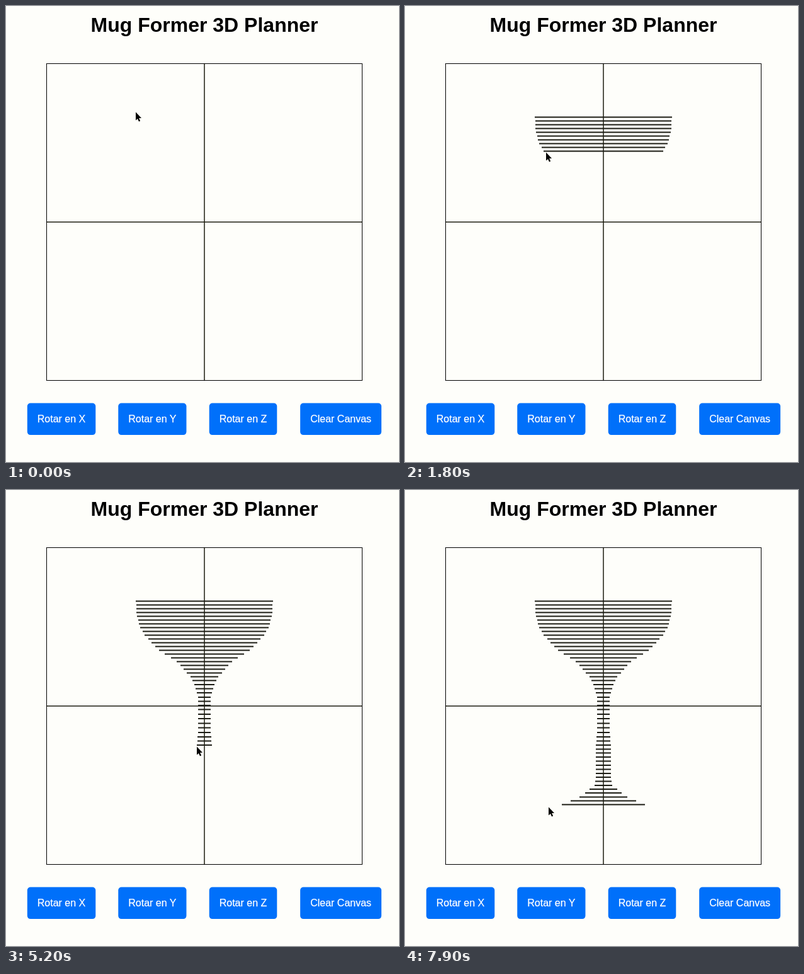
An HTML page for the animation above (8000 ms loop, 624 px wide and 724 px high).

```html
<!DOCTYPE html>
<html lang="en">
<head>
<meta charset="utf-8">
<title>Mug Former 3D Planner</title>
<style>
  html, body { margin: 0; width: 100%; height: 100%; overflow: hidden; background: #fefefa; }
  svg { display: block; width: 624px; height: 724px; }
  text { font-family: "Liberation Sans", Arial, sans-serif; text-anchor: middle; }
  .title { font-size: 32px; font-weight: bold; }
  .button rect { fill: #0070fa; }
  .button text { font-size: 16px; fill: #fff; stroke: #fff; stroke-width: .25; }
  .frame { fill: none; stroke: #000; }
  .axis { stroke: #1c1c10; stroke-width: 1.5; }
  .rings line { stroke: #1c1c14; stroke-width: 2; }
</style>
</head>
<body>
<svg viewBox="0 0 624 724">
  <text class="title" x="315" y="41">Mug Former 3D Planner</text>
  <rect class="frame" x="64.5" y="91.5" width="501" height="503"/>
  <path class="axis" d="M315 92V594M65 343H565"/>
  <g class="rings" id="rings"></g>
  <g id="buttons"></g>
  <g id="cursor">
    <path d="M0 0V13L3 10.4L5 15L7.1 14.1L5.1 9.5H9Z" fill="#000" stroke="#fffff0" paint-order="stroke"/>
  </g>
</svg>
<script>
const LOOP = 8000, STEP = 100, CENTER = 315, RINGS = 52;
const $ = id => document.getElementById(id);

// Key points: ring number to height, height to radius, time to pointer height
const rows = [[0, 176.5], [21, 302.5], [28, 348.5], [34, 392], [46, 469], [51, 499.5]];
const profile = [[176, 109], [201, 107], [218, 102], [230, 95], [254, 73], [273, 43], [297, 22],
  [310, 15], [329, 10], [384, 10], [411, 12], [457, 12], [469, 14], [487, 37], [499.5, 66], [505, 87]];
const travel = [[0, 170], [2700, 266], [3900, 323], [5200, 409], [6100, 471], [7900, 505]];

function lerp(points, x) {
  const next = points.findIndex(p => p[0] >= x);
  if (next < 0) return points[points.length - 1][1];
  if (next === 0) return points[0][1];
  const [x0, y0] = points[next - 1], [x1, y1] = points[next];
  return y0 + (y1 - y0) * (x - x0) / (x1 - x0);
}

function add(parent, tag, attrs, text = "") {
  const el = document.createElementNS("http://www.w3.org/2000/svg", tag);
  for (const key in attrs) el.setAttribute(key, attrs[key]);
  el.textContent = text;
  return parent.appendChild(el);
}

const rings = Array.from({ length: RINGS }, (_, i) => {
  const y = Math.round(lerp(rows, i) * 2) / 2;
  const r = Math.round(lerp(profile, y));
  return { y, el: add($("rings"), "line", { x1: CENTER - r, x2: CENTER + r, y1: y, y2: y }) };
});

["Rotar en X", "Rotar en Y", "Rotar en Z", "Clear Canvas"].forEach((label, i) => {
  const x = 33.8 + 144.45 * i;
  const g = add($("buttons"), "g", { class: "button" });
  const rect = add(g, "rect", { x, y: 630.6, height: 50.5, rx: 5 });
  const text = add(g, "text", { y: 661 }, label);
  const width = text.getComputedTextLength() + 32;
  rect.setAttribute("width", width);
  text.setAttribute("x", x + width / 2);
});

function draw(now) {
  const t = Math.floor(now % LOOP / STEP) * STEP;
  const y = lerp(travel, t);
  const x = CENTER - lerp(profile, y);
  for (const ring of rings) {
    ring.el.setAttribute("visibility", ring.y <= y ? "visible" : "hidden");
  }
  // The arrow's tip sits just above the drawing point
  $("cursor").setAttribute("transform", `translate(${Math.round(x)} ${Math.round(y) - 1.5})`);
}

let start;
function tick(now) {
  start ??= now;
  draw(now - start);
  requestAnimationFrame(tick);
}
draw(0);
requestAnimationFrame(tick);
</script>
</body>
</html>
```
